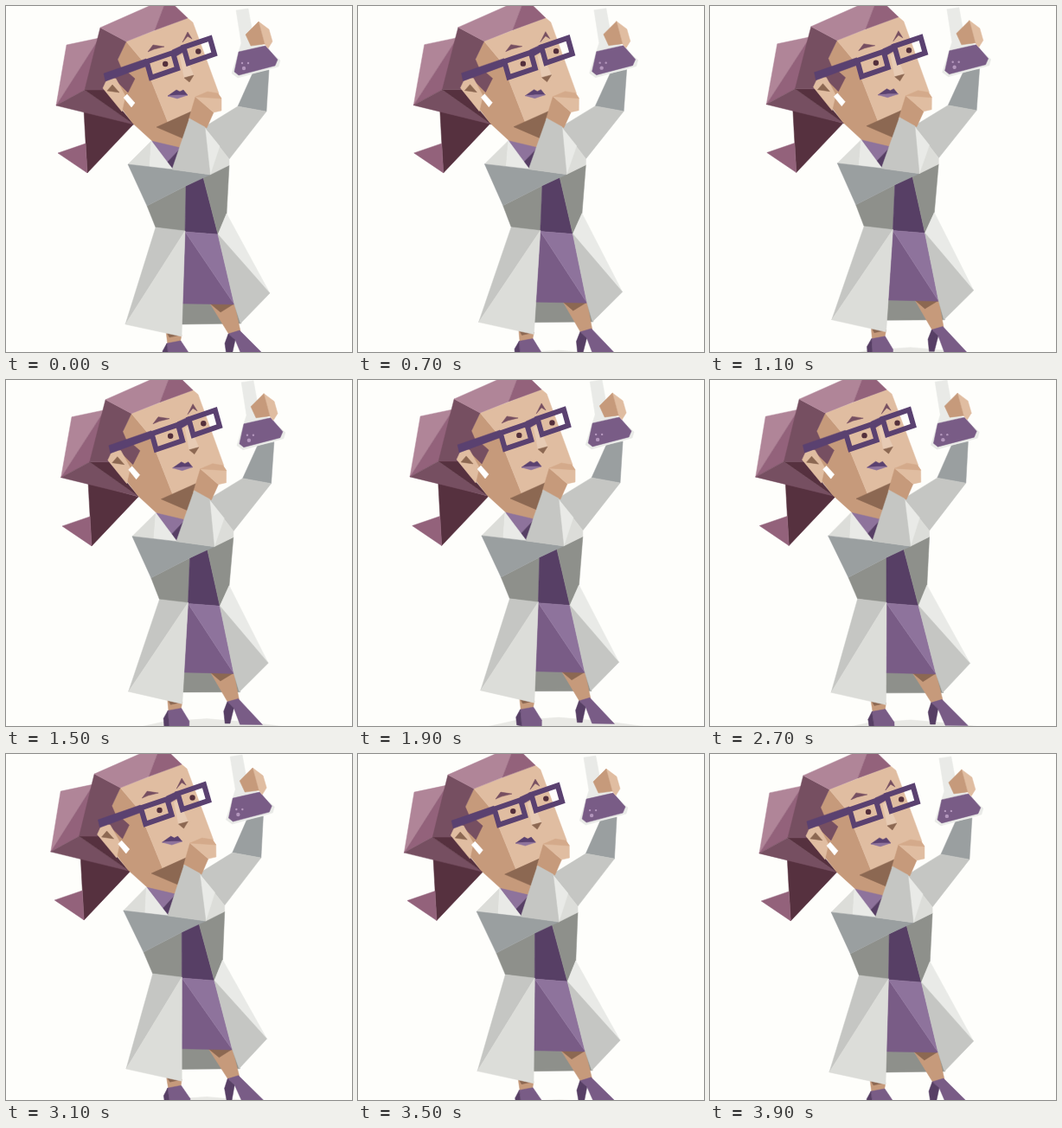
An HTML page that plays this animation: 400 px wide and 400 px high, repeating every 4 s.

```html
<!DOCTYPE html>
<html lang="en">
<head>
<meta charset="utf-8">
<title>Scientist with flask</title>
<style>
html, body { margin: 0; width: 100%; height: 100%; overflow: hidden; background: #fefefb; }
svg { display: block; width: 100vw; height: 100vh; }
</style>
</head>
<body>
<svg id="stage" viewBox="0 0 400 400"></svg>
<script>
const NS = 'http://www.w3.org/2000/svg';
const stage = document.getElementById('stage');
const LOOP = 4000, STEP = 100;

const COLORS = {
  hairLight: '#b08598', hair: '#93627b', hairDark: '#764f61', hairDeep: '#56313f',
  skin: '#e0bda1', skinLight: '#e7cbb4', skinMid: '#d4aa8b', tan: '#c69a7b', brown: '#8c6852',
  white: '#e9eae7', pale: '#dcddd9', gray: '#c5c6c3', steel: '#9a9fa0', shade: '#8e908b',
  violet: '#795c86', lilac: '#8e739c', plum: '#573f65', frame: '#5a4170',
  bubble: '#b497bd', eye: '#54303c', pearl: '#ffffff', ground: '#e9e9e5'
};

const clamp = v => Math.max(0, Math.min(1, v));

// The body leans with the sine and stretches with the cosine, more at the hem.
function bodyMove(x, y, s, c) {
  const sway = 7.4 * (1 - (y / 385) ** 2);
  const flare = clamp((y - 200) / 80);
  const spread = flare * 0.022 * (x - 222) - 0.5 * (1 - flare);
  const low = clamp((y - 255) / 125);
  const bob = 1.6 + low * (2.7 - 0.007 * (x - 225));
  return [x + sway * s + spread * (c - 1), y + bob * (c - 1) + 0.6 * (1 - low) * s];
}
const tailMove = (x, y, s, c) => [x + 4.7 * s - (c - 1), y + 0.8 * (c - 1) + 0.4 * s];
const groundMove = (x, y, s, c) => [x, y + 5.5 * (c - 1)];

const parts = [];
function add(tag, pts, attrs, move = bodyMove) {
  const el = document.createElementNS(NS, tag);
  for (const k in attrs) el.setAttribute(k, attrs[k]);
  stage.appendChild(el);
  parts.push({ el, pts, move });
}

// Corners are lettered a, b, c... in order; each face is "color:letters".
function mesh(corners, faces, move) {
  const pts = corners.split(' ').map(p => p.split(',').map(Number));
  for (const face of faces.split(' ')) {
    const [name, letters] = face.split(':');
    const fill = COLORS[name];
    add('polygon', [...letters].map(l => pts[l.charCodeAt(0) - 97]),
      { fill, stroke: fill, 'stroke-width': 0.5, 'stroke-linejoin': 'round' }, move);
  }
}

const dot = (name, x, y, r) => add('circle', [[x, y]], { fill: COLORS[name], r });

// A slanted lens rim around a centre.
function lens(x, y) {
  const pts = [[-1, -1], [1, -1], [1, 1], [-1, 1]]
    .map(([i, j]) => [x + 15.2 * i + 2.6 * j, y - 5.2 * i + 9.2 * j]);
  add('polygon', pts, { fill: 'none', stroke: COLORS.frame, 'stroke-width': 6 });
}

function drawLegs() {
  mesh('148,412 182,404.5 232,401 290,406 335,412', 'ground:abcde', groundMove);
  mesh('204,342 264,343 272,367 203,368', 'shade:abcd');
  mesh('236,344 264,344 271,376 258,380 248,354', 'tan:abcd brown:abe');
  mesh('185,376 203,380 201,391 187,392 189,383', 'tan:abcd brown:abe');
  mesh('257,379 270,375 300,405 273,405 265,386 261,404 255,404 253,390', 'violet:abcde plum:aefgh');
  mesh('186,390 202,387 212,402 212,409 188,409 182,408 181,399', 'violet:abcde plum:aefg');
}

function drawHair() {
  mesh('90,120 148,136 94,193 92,159 60,170', 'hairDeep:abc hair:dce', tailMove);
  mesh('70,45 108,37 58,115 91,97 114,97 148,137 112,60',
    'hairLight:abc hair:bgdc hairDark:cdf hairDeep:def');
}

function drawHead() {
  mesh('109,25 139,41 129,62 118,82 113,97 91,97 210,14 216,19 246,101 240,112 214,122 187,134 ' +
    '160,66 174,140 209,155 201,165 170,157 147,136 134,119 186,-9 172,28 135,76',
    'tan:bmlkopqrsdc skin:bghijklm brown:nko hairDark:abcvdef hairLight:atub hair:tgu');
  mesh('123,82 141,77 149,84 141,100', 'hairDark:abcd');
  mesh('118,82 112,95 134,122 138,104 127,84', 'skin:abcde');
  mesh('117,98 123,91 131,100', 'brown:abc');
  mesh('136,106 140,102 149,112 145,117', 'pearl:abcd');
  mesh('164,53 170,45 183,47 171,50', 'hairDark:abcd');
  mesh('204,42 210,30 215,38 210,35', 'hairDark:abcd');
  mesh('201,58 206,55 217,80 206,83 212,88', 'skinLight:abcd brown:dce');
  mesh('187,104 197,97 201,99 205,97 210,103 199,103 198,107', 'frame:abcdef lilac:afeg');
  dot('eye', 184.2, 67, 3.2);
  dot('eye', 222.3, 52.5, 3.2);
}

function drawGlasses() {
  mesh('113,78 162,61 164,69 115,87', 'frame:abcd');
  mesh('192,51 205,45 207,52 195,59', 'frame:abcd');
  lens(180.4, 68.4);
  lens(223.2, 51.7);
}

function drawCoat() {
  mesh('168,156 202,164 186,181 193,189', 'lilac:abc plum:bdc');
  // bodice and skirt
  mesh('163,231 208,208 207,261 173,256 228,198 245,264 258,184 255,240 264,345 204,344',
    'shade:abcd plum:befc shade:eghf violet:cij lilac:cfi');
  // chest and sleeve across it
  mesh('141,183 168,156 166,186 193,189 236,195 208,208 163,231',
    'pale:abc white:bdc steel:adefg');
  // coat tails
  mesh('173,256 207,260 138,368 203,382 245,264 255,240 305,332 271,367 264,345',
    'gray:abc pale:bdc white:efg gray:eghi');
}

function drawArms() {
  mesh('285,78 304,74 301,122 268,116 229,140 258,177 258,184 236,195 247,162',
    'steel:abcd gray:edcf pale:efgh white:eih');
  mesh('219,105 233,99 245,101 249,107 249,121 240,123 232,141 211,132',
    'tan:afgh skin:abcdef skinMid:abcd');
  mesh('212,130 230,140 236,195 192,189', 'gray:abcd');
}

function drawFlask() {
  mesh('266,5 280,3 286,36 317,63 315,70 268,83 261,78 272,43', 'white:abcdefgh');
  mesh('269,53 300,46 314,62 311,69 269,80 264,76', 'violet:abcdef');
  dot('bubble', 273, 66, 1.2);
  dot('bubble', 280, 66, 1.2);
  dot('bubble', 275, 72, 2.2);
  mesh('277,33 292,18 304,27 308,41 303,49 299,44 283,46', 'skin:bcdef tan:abfg');
}

drawLegs();
drawHair();
drawHead();
drawGlasses();
drawCoat();
drawArms();
drawFlask();

function render(ms) {
  const t = Math.floor((ms % LOOP) / STEP) * STEP;
  const angle = 2 * Math.PI * t / LOOP;
  const s = Math.sin(angle), c = Math.cos(angle);
  for (const { el, pts, move } of parts) {
    const moved = pts.map(([x, y]) => move(x, y, s, c).map(v => v.toFixed(2)));
    if (el.tagName === 'circle') {
      el.setAttribute('cx', moved[0][0]);
      el.setAttribute('cy', moved[0][1]);
    } else {
      el.setAttribute('points', moved.join(' '));
    }
  }
}

function tick() {
  render(performance.now());
  requestAnimationFrame(tick);
}
tick();
</script>
</body>
</html>
```
